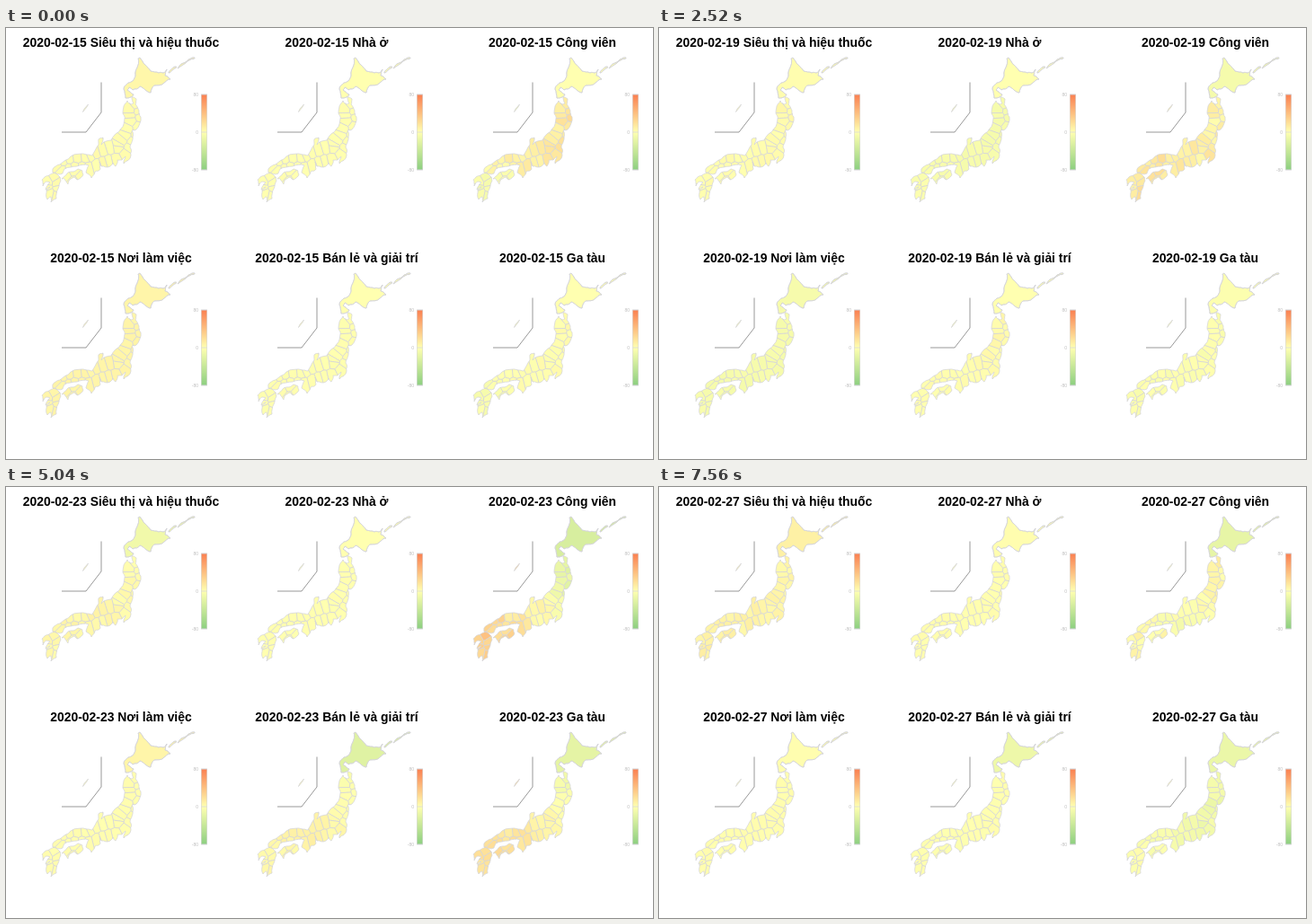
Write an HTML page that moves like this. It is 720 px wide and 480 px high and loops after 8 s.

```html
<!DOCTYPE html>
<html lang="vi">
<head>
<meta charset="utf-8">
<title>Bản đồ di chuyển</title>
<style>
  html, body { margin: 0; width: 100%; height: 100%; overflow: hidden; background: #fff; }
  svg { display: block; width: 720px; height: 480px; }
  .title { font: bold 13.9px "Liberation Sans", Arial, sans-serif; text-anchor: middle; fill: #000; }
  .label { font: 5px "Liberation Sans", Arial, sans-serif; text-anchor: end; fill: #bdbdbd; }
  .cell, .coast { stroke: #d5d5d8; stroke-width: .75; stroke-linejoin: round; }
  .coast { fill: none; }
  .bar { fill: url(#ramp); stroke: #d0d0d0; stroke-width: .5; }
  .inset { fill: none; stroke: #606060; stroke-width: .65; }
</style>
</head>
<body>
<svg id="stage" viewBox="0 0 720 480">
  <defs id="defs">
    <linearGradient id="ramp" x2="0" y2="1">
      <stop offset="0" stop-color="rgb(250,127,80)"/>
      <stop offset=".5" stop-color="rgb(255,255,176)"/>
      <stop offset="1" stop-color="rgb(140,207,128)"/>
    </linearGradient>
  </defs>
</svg>
<script>
const STEP = 630, LOOP = 8000, FIRST_DAY = 15;
const HOT = [250, 127, 80], MID = [255, 255, 176], COLD = [140, 207, 128];

// Each island: key points of its coast, a spine that its regions line up along,
// the number of regions, and how far south (0 to 1) the spine starts and ends
const islands = [
  { id: 'hokkaido', coast: `147,34 149,33 155,41 161,48 170,50 175,50 179,46 177,53 183,57 176,61
      165,64 161,72 155,69 149,65 141,69 137,66 135,69 142,74 136,78 133,78 131,68 136,61 141,59
      144,53 147,41`, main: true },
  { id: 'near', coast: '181,50 185,47 190,43.5 189,43 183,47', main: true },
  { id: 'far', coast: '191,45 200,39 209,34.5 210,33 203,35 195,40', main: true },
  { id: 'honshu', coast: `140,77 145,79 144,85 148,92 150,99 145,113 140,114 141,124 138,133 139,142
      131,151 133,143 129,147 124,147 122,154 119,150 116,154 106,154 104,149 105,157 99,160 95,167
      89,161 92,153 79,154 65,157 63,162 52,161 52,157 60,152 72,143 90,141 96,142 103,130 103,124
      108,122 106,130 117,125 128,112 132,101 130,95 131,87 135,81 139,85 142,84`,
    spine: '141,85 144,102 138,122 128,138 110,142 92,150 74,150 56,157', count: 34, south: [0, .75] },
  { id: 'shikoku', coast: `80,157 85,159 86,163 80,169 76,166 72,168 69,174 67,171 65,168 62,168
      68,162 75,160`, spine: '84,161 66,169', count: 4, south: [.8, .8] },
  { id: 'kyushu', coast: `53,161 59,165 61,170 58,179 56,190 50,194 50,188 46,191 45,180 49,177 44,180
      49,172 45,171 41,176 40,169 43,166 48,164`, spine: '50,164 53,190', count: 7, south: [.9, 1] }
];

// A mood starts on a day and lasts until the next one:
// one value for all, or Hokkaido, north, middle, south
const panels = [
  { name: 'Siêu thị và hiệu thuốc', spread: 2, moods: {
    0: [5, 1, 1, 1], 1: 1, 3: [1, 4, 1, 1], 5: 1, 8: [-10, 1, 6, 3], 9: [3, 4, 6, 3], 10: [9, 5, 7, 9] } },
  { name: 'Nhà ở', spread: 1, moods: { 0: 0, 1: 2, 3: [0, -6, -6, -3], 5: 0, 9: 18, 10: 1 } },
  { name: 'Công viên', spread: 5, moods: {
    0: [0, 16, 12, -6], 1: [-17, -3, -5, -14], 3: [-7, 7, 13, 14], 5: [-8, 0, 8, 12],
    8: [-28, -26, 14, 34], 9: [-8, 0, 70, 30], 10: [-17, 6, -3, 6] } },
  { name: 'Nơi làm việc', spread: 1, moods: { 0: 6, 1: 1, 3: -6, 5: 1, 8: [6, 1, 1, 1], 9: -50, 10: 1 } },
  { name: 'Bán lẻ và giải trí', spread: 2, moods: {
    0: 0, 1: [-14, 0, 0, -2], 3: [0, 4, 1, 1], 5: 0, 8: [-22, -4, 8, 4], 9: [6, 24, 28, 25],
    10: [-12, 0, 0, 0] } },
  { name: 'Ga tàu', spread: 3, moods: {
    0: [0, 2, 0, -4], 1: 2, 3: -2, 5: [1, 1, 1, 3], 8: [-18, -10, 14, 20], 9: [-30, 0, 3, 8],
    10: [-14, -10, -8, 1] } }
];

const stage = document.getElementById('stage');
const mix = (a, b, k) => a + (b - a) * k;
const points = s => s.trim().split(/\s+/).map(p => p.split(',').map(Number));
const toPath = pts => 'M' + pts.map(p => p.map(v => v.toFixed(2))).join('L') + 'Z';

// Seeded noise from -1 to 1
function noise(a, b = 0, c = 0) {
  const s = Math.sin(a * 12.99 + b * 78.23 + c * 37.72 + 4) * 43758.55;
  return (s - Math.floor(s)) * 2 - 1;
}

function add(parent, tag, attrs, text) {
  const el = document.createElementNS(stage.namespaceURI, tag);
  for (const key in attrs) el.setAttribute(key, attrs[key]);
  if (text) el.textContent = text;
  return parent.appendChild(el);
}

// Splits each edge and nudges its middle sideways, for a ragged coast
function roughen(pts) {
  return pts.flatMap((p, i) => {
    const q = pts[(i + 1) % pts.length], k = noise(p[0], p[1]) * .12;
    return [p, [mix(p[0], q[0], .5) + (q[1] - p[1]) * k, mix(p[1], q[1], .5) - (q[0] - p[0]) * k]];
  });
}

// Keeps the part of a polygon that lies nearer to a than to b
function nearer(poly, a, b) {
  const side = p => (p[0] - (a[0] + b[0]) / 2) * (b[0] - a[0]) + (p[1] - (a[1] + b[1]) / 2) * (b[1] - a[1]);
  return poly.flatMap((p, i) => {
    const q = poly[(i + 1) % poly.length], sp = side(p), sq = side(q), k = sp / (sp - sq);
    const kept = sp <= 0 ? [p] : [];
    if (sp * sq < 0) kept.push([mix(p[0], q[0], k), mix(p[1], q[1], k)]);
    return kept;
  });
}

// Region centres alternate on both sides of the spine, wider apart halfway
function centres({ spine, count }) {
  const keys = points(spine);
  return Array.from({ length: count }, (_, i) => {
    const t = (i + .5) / count, at = t * (keys.length - 1), n = Math.floor(at);
    const [a, b] = [keys[n], keys[n + 1]], len = Math.hypot(b[0] - a[0], b[1] - a[1]);
    const off = (i % 2 ? 1 : -1) * (3.5 + 4 * Math.sin(Math.PI * t)) / len;
    return [mix(a[0], b[0], at - n) - (b[1] - a[1]) * off + noise(i, 1),
            mix(a[1], b[1], at - n) + (b[0] - a[0]) * off + noise(i, 2)];
  });
}

const regions = [];
for (const isle of islands) {
  isle.path = toPath(roughen(roughen(points(isle.coast))));
  add(add(document.getElementById('defs'), 'clipPath', { id: isle.id }), 'path', { d: isle.path });
  if (isle.main) {
    regions.push({ main: true, path: isle.path });
    continue;
  }
  const seeds = centres(isle);
  seeds.forEach((seed, i) => {
    const poly = seeds.reduce((cut, other) => (other === seed ? cut : nearer(cut, seed, other)),
      [[0, 0], [240, 0], [240, 240], [0, 240]]);
    regions.push({ clip: isle.id, path: toPath(poly), south: mix(...isle.south, i / (seeds.length - 1)) });
  });
}
regions.push({ south: 1, path: 'M85.5 93.5L87 90L91.5 85L90 88Z' });

function build(panel, n) {
  const g = add(stage, 'g', { transform: `translate(${n % 3 * 240} ${n > 2 ? 240 : 0})` });
  panel.title = add(g, 'text', { class: 'title', x: 128, y: 21.4 });
  panel.cells = regions.map(({ clip, path }) => {
    const holder = clip ? add(g, 'g', { 'clip-path': `url(#${clip})` }) : g;
    return add(holder, 'path', { class: 'cell', d: path });
  });
  for (const { path } of islands) add(g, 'path', { class: 'coast', d: path });
  add(g, 'path', { class: 'inset', d: 'M62 116H89L106 94V60.5' });
  add(g, 'rect', { class: 'bar', x: 217.25, y: 74, width: 6.5, height: 84 });
  [80, 0, -80].forEach((v, i) => {
    const y = 74 + i * 42;
    add(g, 'text', { class: 'label', x: 214, y: y + 1.8 }, String(v));
    add(g, 'path', { class: 'coast', d: `M217.25 ${y}h6.5` });
  });
}

function moodOn(panel, day) {
  const start = Math.max(...Object.keys(panel.moods).filter(d => d <= day));
  const mood = panel.moods[start];
  return Array.isArray(mood) ? mood : Array(4).fill(mood);
}

function tint(v) {
  const end = v > 0 ? HOT : COLD, k = Math.min(1, Math.abs(v) / 80);
  return `rgb(${MID.map((c, i) => Math.round(mix(c, end[i], k)))})`;
}

function show(day) {
  panels.forEach((panel, n) => {
    const [hokkaido, north, middle, south] = moodOn(panel, day);
    panel.title.textContent = `2020-02-${FIRST_DAY + day} ${panel.name}`;
    regions.forEach((r, i) => {
      let v = hokkaido;
      if (!r.main) {
        v = r.south < .5 ? mix(north, middle, r.south * 2) : mix(middle, south, r.south * 2 - 1);
        v += noise(i, n, day) * panel.spread * (1 + Math.abs(v) / 25);
      }
      panel.cells[i].setAttribute('fill', tint(v));
    });
  });
}

panels.forEach(build);
let shown = 0;
show(0);
const start = performance.now();
function tick(now) {
  const day = Math.floor(Math.max(0, now - start) % LOOP / STEP);
  if (day !== shown) show(shown = day);
  requestAnimationFrame(tick);
}
requestAnimationFrame(tick);
</script>
</body>
</html>
```
